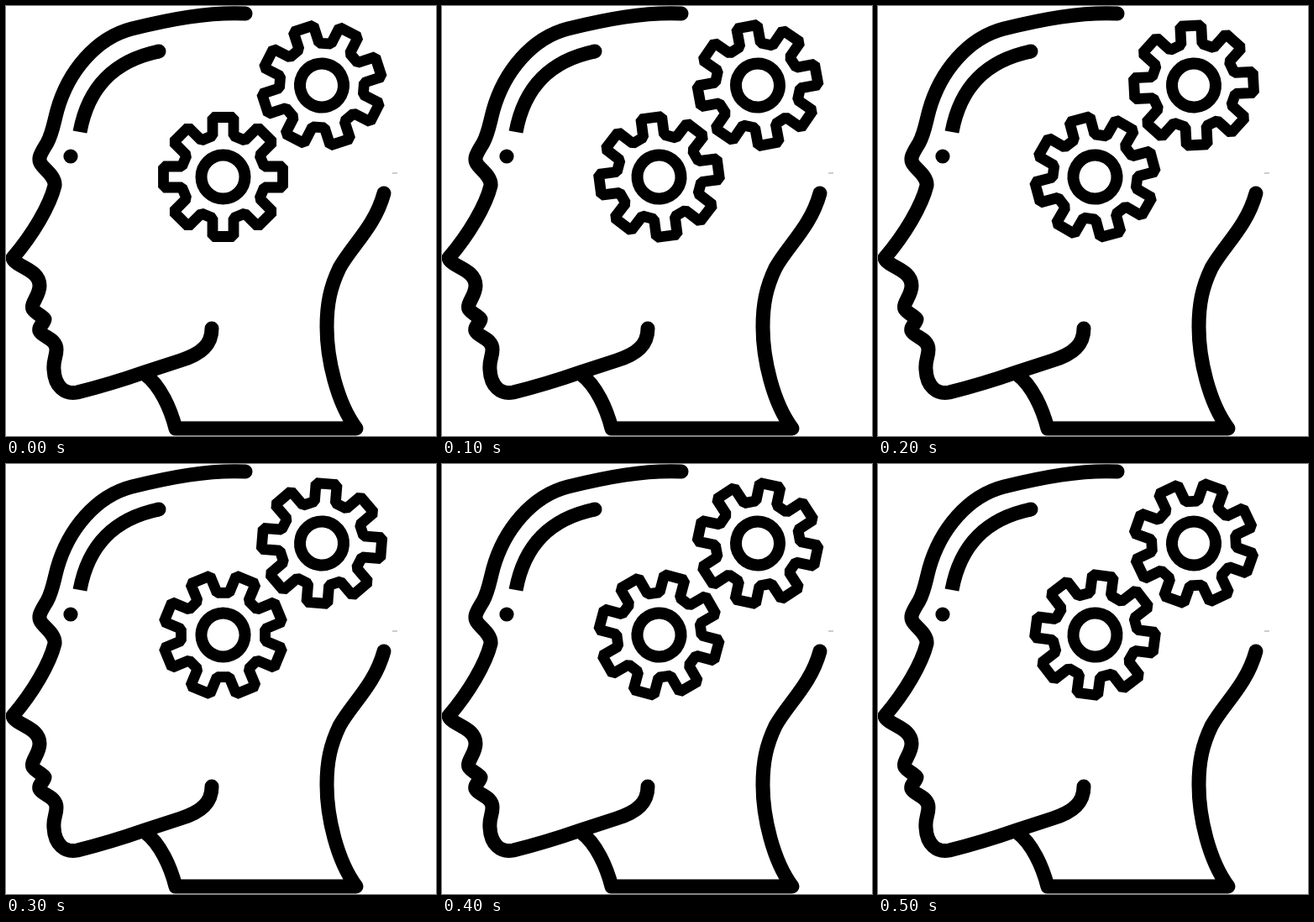
Animation, 512 px wide and 512 px high, one loop 0.6 s. Source, as an HTML page with a canvas:

```html
<!DOCTYPE html>
<html lang="en">
<head>
<meta charset="utf-8">
<title>Thinking head</title>
<style>
  html, body { margin: 0; width: 100%; height: 100%; overflow: hidden; background: #fff; }
  canvas { display: block; width: 100vw; height: 100vh; }
</style>
</head>
<body>
<canvas id="stage" width="512" height="512"></canvas>
<script>
const ctx = document.getElementById('stage').getContext('2d');
const TAU = Math.PI * 2;
const TEETH = 8;
const STEPS = 6;
const STEP_MS = 100;
const STEP_ANGLE = TAU / TEETH / STEPS;

const face = new Path2D(
  'M285 9 C240 7 195 16 150 27 C107 38 74 78 61 124 C56 143 55 152 49 163 ' +
  'C42 175 36 182 43 190 C49 197 59 204 58 214 C52 238 32 272 8 300 ' +
  'C11 311 40 313 40 333 C40 345 29 354 32 361 C35 366 45 370 46 373 ' +
  'C46 377 38 382 40 387 C43 394 60 396 60 409 C60 418 56 422 57 433 ' +
  'C58 453 70 463 85 460 Q125 450 165 436 L208 422 C233 414 245 403 245 384');
const neck = new Path2D(
  'M165 438 C184 452 196 480 202 503 H417 C394 472 382 420 382 382 ' +
  'C382 355 386 335 397 312 C412 285 439 263 450 223');
const shine = new Path2D('M182 54 C129 65 98 96 88 150');

function makeGear() {
  const half = 12.5, tip = 71, root = 49;
  const tooth = [[-half, root], [-half, tip], [half, tip], [half, root]];
  const path = new Path2D();
  for (let i = 0; i < TEETH; i++) {
    const a = i * TAU / TEETH, c = Math.cos(a), s = Math.sin(a);
    for (const [x, r] of tooth) path.lineTo(x * c + r * s, x * s - r * c);
  }
  path.closePath();
  return path;
}
const gear = makeGear();

function disc(x, y, r) {
  ctx.beginPath();
  ctx.arc(x, y, r, 0, TAU);
}

function drawGear(x, y, angle) {
  ctx.save();
  ctx.translate(x, y);
  ctx.rotate(angle);
  ctx.lineJoin = 'bevel';
  ctx.lineWidth = 12.8;
  ctx.stroke(gear);
  ctx.lineWidth = 14;
  disc(0, 0, 26);
  ctx.stroke();
  ctx.restore();
}

function drawHead() {
  ctx.lineWidth = 17;
  ctx.lineCap = ctx.lineJoin = 'round';
  ctx.stroke(face);
  ctx.stroke(neck);
  // The highlight is round at the top and cut flat at the bottom
  ctx.lineCap = 'butt';
  ctx.stroke(shine);
  disc(182, 54, 8.5);
  ctx.fill();
  disc(77, 179, 8.6);
  ctx.fill();
  ctx.fillStyle = '#999';
  ctx.fillRect(460, 198.5, 6, 1);
}

function draw(now) {
  const turn = Math.floor(now / STEP_MS) % STEPS * STEP_ANGLE;
  ctx.fillStyle = '#fff';
  ctx.fillRect(0, 0, 512, 512);
  ctx.fillStyle = ctx.strokeStyle = '#000';
  drawGear(258.5, 203.5, -turn);
  drawGear(376, 94.5, turn - Math.PI / 10);
  drawHead();
}

let start;
function tick(now) {
  start ??= now;
  draw(now - start);
  requestAnimationFrame(tick);
}
draw(0);
requestAnimationFrame(tick);
</script>
</body>
</html>
```
